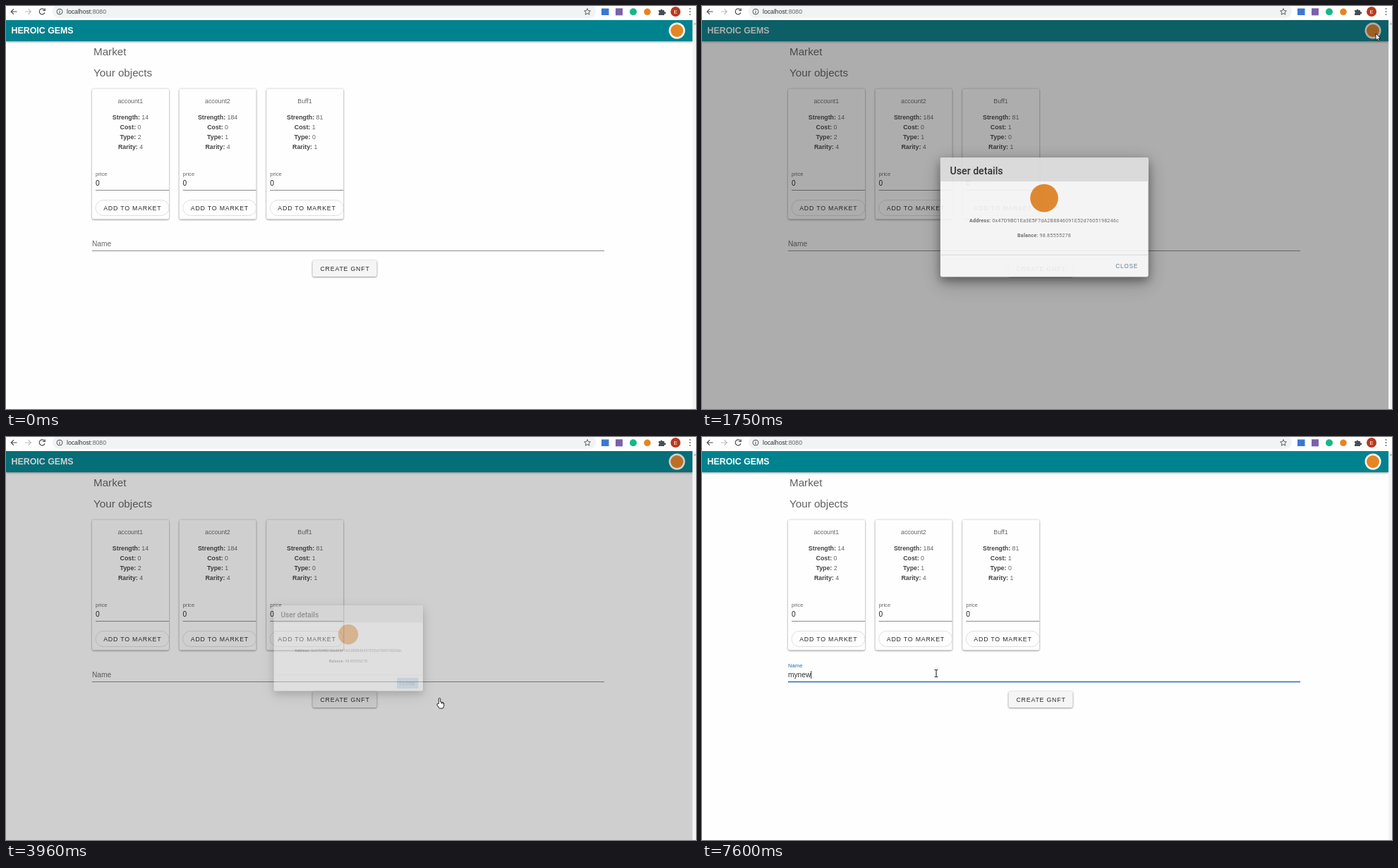
Animation, 978 px wide and 572 px high, one loop 8000 ms. Source, as an HTML page:

```html
<!DOCTYPE html>
<html lang="en">
<head>
<meta charset="utf-8">
<title>Market</title>
<style>
  html, body { margin: 0; height: 100%; overflow: hidden; background: #fefefe; }
  svg { display: block; width: 978px; height: 572px; font-family: "Liberation Sans", Arial, sans-serif; }
  text { white-space: pre; }
  .bold { font-weight: 700; }
  .mid { text-anchor: middle; }
  .btn { font-size: 8.8px; letter-spacing: .79px; fill: #2b2b2b; }
  .raised { filter: drop-shadow(0 1px .8px #0005) drop-shadow(0 0 .8px #0003); }
  .icon { fill: none; stroke: #4a4d51; stroke-width: 1.2; }
  .modal { font-family: Roboto, sans-serif; }
  .modal .btn { font-family: "Liberation Sans", Arial, sans-serif; fill: #587b9a; }
  .modal .info { font-size: 7.6px; letter-spacing: .22px; fill: #666; }
  .pointer { fill: #fff; stroke: #111; stroke-width: .9; stroke-linejoin: round; }
</style>
</head>
<body>
<svg viewBox="0 0 978 572">
  <rect width="978" height="572" fill="#fefefe"/>

  <g id="page">
    <rect y="20" width="973" height="30" fill="#00838f" style="filter:drop-shadow(0 1.5px 1.5px #0006)"/>
    <text x="7.5" y="39.3" font-size="12.4" class="bold" fill="#fff">HEROIC GEMS</text>
    <circle cx="951" cy="35" r="11.5" fill="#fff"/>
    <circle cx="951" cy="35" r="9" fill="#e58523"/>
    <g font-size="15.2" fill="#606060">
      <text x="124" y="70.2">Market</text>
      <text x="124" y="100.2">Your objects</text>
    </g>
    <g id="cards"></g>
    <path id="line" d="M122 347.5H848" stroke="#8c8c8c"/>
    <path id="focusLine" d="M122 347.4H848" stroke="#1f6fb0" stroke-width="1.5"/>
    <text id="label">Name</text>
    <text id="typed" x="122" y="340.8" font-size="10.2" fill="#333"></text>
    <rect id="caret" y="332" width=".9" height="11" fill="#222"/>
    <rect class="raised" x="434.5" y="361" width="91" height="23" rx="2.5" fill="#f5f5f5"/>
    <text x="480.5" y="375.9" class="btn mid">CREATE GNFT</text>
  </g>

  <rect id="shade" y="20" width="973" height="552" fill="#212121"/>

  <g id="modal" class="modal">
    <rect x="329" y="210" width="312.5" height="179.5" rx="2.5" fill="#fefefe"
      style="filter:drop-shadow(0 6px 7px #0006) drop-shadow(0 7px 14px #0004)"/>
    <path d="M329 246V212.5a2.5 2.5 0 0 1 2.5-2.5H639a2.5 2.5 0 0 1 2.5 2.5V246z" fill="#e0e0e0"/>
    <text x="343.5" y="235.1" font-size="15" font-weight="500" fill="#222">User details</text>
    <circle cx="485" cy="271" r="21" fill="#e58523"/>
    <text x="485" y="307.6" class="info mid"><tspan class="bold">Address:</tspan> 0x47D9BC1Ea3E5F7dA2B8846091E52d7605198246c</text>
    <text x="485" y="330.2" class="info mid"><tspan class="bold">Balance:</tspan> 98.85555278</text>
    <path d="M329 356.5H641.5" stroke="#dedede"/>
    <rect id="closeBg" x="587" y="362" width="45" height="22.5" rx="2.5" fill="#1f70b8"/>
    <text x="592.3" y="376.5" class="btn">CLOSE</text>
  </g>

  <g id="browser">
    <rect width="978" height="20" fill="#fff"/>
    <rect x="66" y="-2" width="770" height="19" rx="9.5" fill="#f1f3f4"/>
    <g class="icon">
      <path d="M15.5 8H7.5M11 4.200L7.200 8L11 11.800"/>
      <path d="M27 8H35M31.500 4.200L35.300 8L31.500 11.800" stroke="#b9bbbd"/>
      <path d="M54.500 5.500A4 4 0 1 0 55 9.300M55.300 3.500V6.500H52"/>
      <circle cx="76" cy="8" r="4" stroke-width=".9"/>
      <path d="M76 7.300V10.500M76 5.300V6.300" stroke-width="1"/>
      <path d="M824 3.600L825.300 6.600L828.400 6.900L826 9L826.800 12.200L824 10.500L821.200 12.200L822 9L819.600 6.900L822.700 6.600Z" stroke-width=".9"/>
    </g>
    <text x="86" y="11.200" font-size="8.700" fill="#333">localhost<tspan fill="#666">:8080</tspan></text>
    <rect x="844" y="3.500" width="10.500" height="9.500" fill="#3b78d0"/>
    <rect x="864" y="3.300" width="10" height="10" fill="#7b62ab"/>
    <circle cx="889" cy="8.300" r="5" fill="#15b886"/>
    <circle cx="909" cy="8.300" r="4.800" fill="#e58523"/>
    <path d="M925 6h2.500a1.500 1.500 0 1 1 3 0h2.500v2.500a1.500 1.500 0 1 1 0 2.500v2h-8v-2.500a1.300 1.300 0 0 0 0-2.500z" fill="#4a4d51"/>
    <circle cx="949" cy="8" r="7" fill="#b8391f"/>
    <text x="949" y="10.800" font-size="7.500" class="mid" fill="#fff">E</text>
    <path d="M969.500 3.200v1.600m0 2.400v1.600m0 2.400v1.600" stroke="#4a4d51" stroke-width="1.700"/>
    <rect x="973" y="20" width="5" height="552" fill="#f3f3f3"/>
    <path d="M974.500 26.500L976.500 24L978 26z" fill="#999"/>
  </g>

  <g id="cursor">
    <circle id="halo" r="8" fill="#faf500" fill-opacity=".58"/>
    <path id="arrow" class="pointer" d="M0 0V9.700L2.300 7.600L3.900 11.200L5.500 10.500L3.900 7H7z"/>
    <path id="hand" class="pointer" d="M-1.200 7V.3a1.200 1.200 0 0 1 2.400 0V4.600q4.300 .2 5 1.600v3.800l-1.300 3.600h-5.200l-3.300-5q-.4-1.900 2.400-1.600zM3 5v2.200M4.700 5.400v2"/>
    <path id="beam" d="M-2.300-5h1.800l.5.500.5-.5h1.800M0-4.500v9M-2.300 5h1.800l.5-.5.5.5h1.800" fill="none" stroke="#111"/>
  </g>
</svg>

<script>
const LOOP = 8000, STEP = 68.85;
const $ = id => document.getElementById(id);
const set = (id, attrs) => { for (const k in attrs) $(id).setAttribute(k, attrs[k]); };
const show = (id, on) => set(id, { visibility: on ? 'visible' : 'hidden' });
const clamp = v => Math.min(1, Math.max(0, v));
const mix = (a, b, p) => a + (b - a) * p;

const cards = [
  ['account1', 14, 0, 2, 4],
  ['account2', 184, 0, 1, 4],
  ['Buff1', 81, 1, 0, 1],
];
$('cards').innerHTML = cards.map(([name, ...stats], i) => `
  <g transform="translate(${122 + i * 123.6})">
    <rect class="raised" y="117.5" width="109" height="185" rx="2.5" fill="#fefefe"/>
    <g class="mid" font-size="8.8" fill="#666">
      <text x="54.3" y="137.6">${name}</text>
      ${['Strength', 'Cost', 'Type', 'Rarity'].map((key, row) =>
        `<text x="54.500" y="${161.3 + row * 13.75}"><tspan class="bold" fill="#444">${key}:</tspan> ${stats[row]}</text>`).join('')}
    </g>
    <text x="5" y="241" font-size="7.650" fill="#666">price</text>
    <text x="5" y="254.800" font-size="10.200" fill="#222">0</text>
    <path d="M5 261.500H109" stroke="#8c8c8c"/>
    <rect x="5" y="275.500" width="104" height="22" rx="11" fill="none" stroke="#dcdcdc" stroke-width=".9"/>
    <text x="57.300" y="289.500" class="btn mid">ADD TO MARKET</text>
  </g>`).join('');

// CSS-style cubic-bezier(x1, y1, x2, y2)
function bezier(x1, y1, x2, y2) {
  const at = (a, b, s) => 3 * (1 - s) ** 2 * s * a + 3 * (1 - s) * s * s * b + s ** 3;
  return x => {
    let lo = 0, hi = 1;
    for (let i = 0; i < 20; i++) {
      const s = (lo + hi) / 2;
      at(x1, x2, s) < x ? lo = s : hi = s;
    }
    return at(y1, y2, lo);
  };
}
const swing = bezier(.25, .8, .25, 1), fade = bezier(.25, .8, .5, 1);

// time, x, y of the pointer tip
const path = [
  [30, 920, 578], [850, 943, 137], [930, 943, 137], [1410, 955, 39],
  [1820, 955, 39], [2290, 576, 272], [2710, 506, 303], [2900, 506, 303],
  [3630, 614.5, 371.500], [4180, 614.5, 371.500], [4590, 338, 320],
  [4730, 334, 324], [5300, 334, 324], [5630, 332, 335.500], [LOOP, 332, 335.500],
];
const within = (t, ...spans) => spans.some(([a, b]) => t >= a && t < b);

const OPEN = 1620, CLOSE = 3880, HOVER = 4640, FOCUS = 5130;
const keys = [6890, 7100, 7310, 7380, 7585];

function drawCursor(t) {
  const i = Math.max(1, path.findIndex(p => p[0] > t));
  const [t0, x0, y0] = path[i - 1], [t1, x1, y1] = path[i];
  const p = clamp((t - t0) / (t1 - t0)), e = p * p * (3 - 2 * p);
  set('cursor', { transform: `translate(${mix(x0, x1, e)} ${mix(y0, y1, e)})` });
  const hand = within(t, [3480, 4230]), beam = within(t, [2640, 3000], [5480, LOOP]);
  show('cursor', t >= 90);
  set('hand', { opacity: +hand });
  set('beam', { opacity: +beam });
  set('arrow', { opacity: +!(hand || beam) });
  set('halo', { opacity: +within(t, [1530, 1600], [3800, 3870], [4900, 5130]) });
}

function drawModal(t) {
  const phase = ease => t < CLOSE ? ease(clamp((t - OPEN) / 300)) : 1 - ease(clamp((t - CLOSE) / 300));
  const p = phase(swing);
  set('shade', { opacity: .46 * phase(fade) });
  set('modal', {
    opacity: p,
    transform: `translate(485.250 299.750) scale(${mix(.5, 1, p)}) translate(-485.250 -299.750)`,
  });
  set('closeBg', { opacity: t < 3480 ? 0 : t < CLOSE ? .12 : .3 });
}

function drawField(t) {
  const p = fade(clamp((t - FOCUS) / 300)), half = 363 * p;
  set('line', { stroke: t < HOVER ? '#8c8c8c' : '#444' });
  set('focusLine', { d: `M${485 - half} 347.400H${485 + half}` });
  set('label', {
    x: 122, y: mix(340.8, 327, p), 'font-size': mix(10.2, 7.65, p),
    fill: t < FOCUS ? '#666' : '#1f70b8',
  });
  $('typed').textContent = 'mynew'.slice(0, keys.filter(k => t >= k).length);
  set('caret', { x: 122 + $('typed').getComputedTextLength() });
  show('caret', within(t, [FOCUS, 5800], [6345, LOOP]));
}

const start = performance.now();
function frame() {
  const now = (performance.now() - start) % LOOP;
  // the screen refreshes at about 14.5 fps
  const t = Math.max(0, 90 + Math.floor((now - 90) / STEP) * STEP);
  drawModal(t);
  drawField(t);
  drawCursor(t);
  requestAnimationFrame(frame);
}
frame();
</script>
</body>
</html>
```
